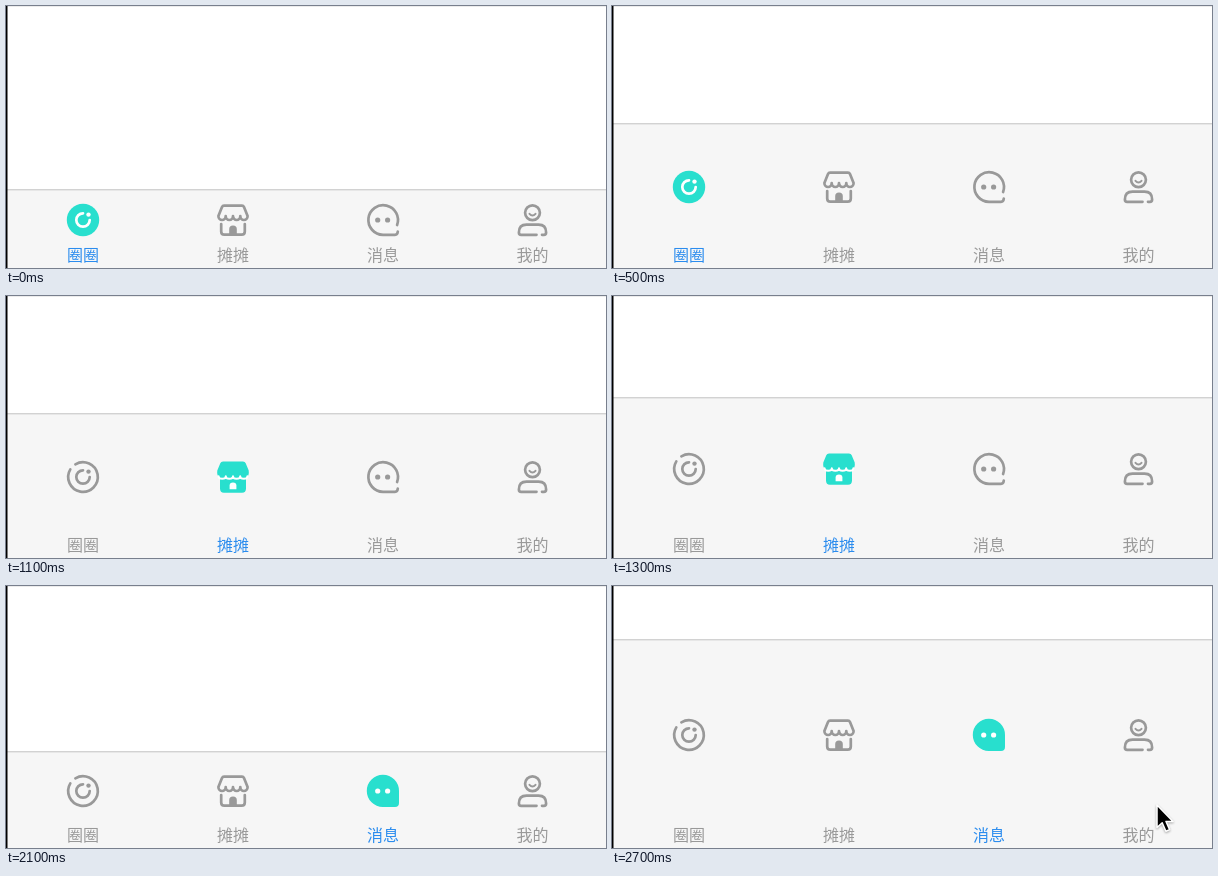
An HTML page that plays this animation: 600x262 px, repeating every 2.8 s.

```html
<!DOCTYPE html>
<html lang="zh-CN">
<head>
<meta charset="utf-8">
<title>Tab bar</title>
<style>
html, body { margin: 0; width: 100%; height: 100%; overflow: hidden; background: #fff; }
svg { display: block; }
text { font: 16px "Noto Sans CJK SC", "Noto Sans CJK", sans-serif; text-anchor: middle; fill: #999; }
.line { fill: none; stroke: #999; stroke-width: 2.7; stroke-linecap: round; stroke-linejoin: round; }
.dot { fill: #999; stroke: none; }
.full { fill: #28dfce; stroke: none; }
.white { fill: #fff; stroke: none; }
.cut { fill: none; stroke: #fff; stroke-width: 2.7; stroke-linecap: round; stroke-linejoin: round; }
.on { display: none; }
.active .on { display: inline; }
.active .off { display: none; }
.active text { fill: #2b8cee; font-weight: 500; }
#cursor { filter: drop-shadow(0 1px 1px #0005); }
</style>
</head>
<body>
<svg width="600" height="262" viewBox="0 0 600 262">
  <rect width="600" height="1" fill="#ececec"/>
  <rect id="bar" width="600" height="262" fill="#f6f6f6"/>
  <rect id="edge" width="600" height="1" fill="#c3c3c3"/>
  <rect width="1.5" height="262" fill="#000"/>

  <g class="tab">
    <g class="icon" data-x="77">
      <g class="off">
        <path class="line" d="M-7.6-12.7A14.8 14.8 0 1 1-12.7-7.6"/>
        <path class="line" d="M0-6.7A6.7 6.7 0 1 0 6.7 0"/>
        <circle class="dot" cx="5.5" cy="-5.4" r="2.2"/>
      </g>
      <g class="on">
        <circle class="full" r="16.2"/>
        <path class="cut" d="M0-6.7A6.7 6.7 0 1 0 6.7 0"/>
        <circle class="white" cx="5.5" cy="-5.4" r="2.2"/>
      </g>
    </g>
    <text x="77" y="255">圈圈</text>
  </g>

  <g class="tab">
    <g class="icon" data-x="227">
      <g class="off">
        <path class="line" d="M-14.6-4L-11-13Q-10.4-14.3-9-14.3H9Q10.4-14.3 11-13L14.6-4a3.65 4 0 0 1-7.3 0a3.65 4 0 0 1-7.3 0a3.65 4 0 0 1-7.3 0a3.65 4 0 0 1-7.3 0Z"/>
        <path class="line" d="M-11.8 4V11.5Q-11.8 14.7-8.6 14.7H8.6Q11.8 14.7 11.8 11.5V4"/>
        <path class="dot" d="M-3.8 14V9Q-3.8 5.4 0 5.4Q3.8 5.4 3.8 9V14Z"/>
      </g>
      <g class="on">
        <path class="full" d="M-10-15.5H10Q12-15.5 12.7-13.8L15.7-6.5Q16.5-1 13 1V11.5Q13 15.7 9 15.7H-9Q-13 15.7-13 11.5V1Q-16.5-1-15.7-6.5L-12.7-13.8Q-12-15.5-10-15.5Z"/>
        <path class="cut" style="stroke-width:1.9" d="M-14.4-.8a3.6 2.6 0 0 0 7.2 0a3.6 2.6 0 0 0 7.2 0a3.6 2.6 0 0 0 7.2 0a3.6 2.6 0 0 0 7.2 0"/>
        <path class="white" d="M-3.4 12.3V8.6Q-3.4 5.6 0 5.6Q3.4 5.6 3.4 8.6V12.3Z"/>
      </g>
    </g>
    <text x="227" y="255">摊摊</text>
  </g>

  <g class="tab">
    <g class="icon" data-x="377">
      <g class="off">
        <path class="line" d="M14.1 5A14.8 14.8 0 1 0 0 14.8H12Q14.6 14.8 14.8 11.5"/>
        <circle class="dot" cx="-5.3" r="2.6"/>
        <circle class="dot" cx="4.6" r="2.6"/>
      </g>
      <g class="on">
        <path class="full" d="M16 0A16.1 16.1 0 1 0 0 16H12Q16 16 16 12Z"/>
        <circle class="white" cx="-5.3" r="2.6"/>
        <circle class="white" cx="4.6" r="2.6"/>
      </g>
    </g>
    <text x="377" y="255">消息</text>
  </g>

  <g class="tab">
    <g class="icon" data-x="526.5">
      <circle class="line" cy="-7.3" r="7.4"/>
      <path class="line" style="stroke-width:2" d="M-3-6.2Q0-2.8 3-6.2"/>
      <path class="line" d="M4 14.8H-11.4Q-13.6 14.8-13.6 12.4Q-13.6 4.6-6 4.6H6Q13.6 4.6 13.6 12.4Q13.6 14.8 11.4 14.8H9.5"/>
    </g>
    <text x="526.5" y="255">我的</text>
  </g>

  <path id="cursor" d="M0 0V22.5L5.2 17.8L8.9 26.2L12.6 24.6L9 16.5H16Z" fill="#000" stroke="#fff" stroke-width="1.5" stroke-linejoin="round"/>
</svg>
<script>
const LOOP = 2800;
// [start ms, value]: each value holds until the next start
const tops = [[0, 183], [100, 165], [200, 149], [300, 133], [400, 117], [1300, 101],
  [1500, 85], [1600, 69], [1800, 117], [1900, 165], [2200, 117], [2300, 149],
  [2400, 117], [2500, 85], [2600, 53]];
const picks = [[0, 0], [800, 1], [1900, 2]];
const pointers = [[0, null], [1700, [381.5, 152.5]], [1900, null], [2700, [545, 219]]];

const $ = id => document.getElementById(id);
const tabs = [...document.querySelectorAll('.tab')];
const icons = [...document.querySelectorAll('.icon')];
const at = (steps, t) => steps.filter(s => s[0] <= t).pop()[1];

function draw(t) {
  const top = at(tops, t), pick = at(picks, t), tip = at(pointers, t);
  $('bar').setAttribute('y', top);
  $('edge').setAttribute('y', top + 0.3);
  const mid = top / 2 + 122.5;
  icons.forEach(el => el.setAttribute('transform', `translate(${el.dataset.x} ${mid})`));
  tabs.forEach((el, i) => el.classList.toggle('active', i === pick));
  $('cursor').style.display = tip ? '' : 'none';
  if (tip) $('cursor').setAttribute('transform', `translate(${tip})`);
}

const start = performance.now();
function tick() {
  draw((performance.now() - start) % LOOP);
  requestAnimationFrame(tick);
}
tick();
</script>
</body>
</html>
```
